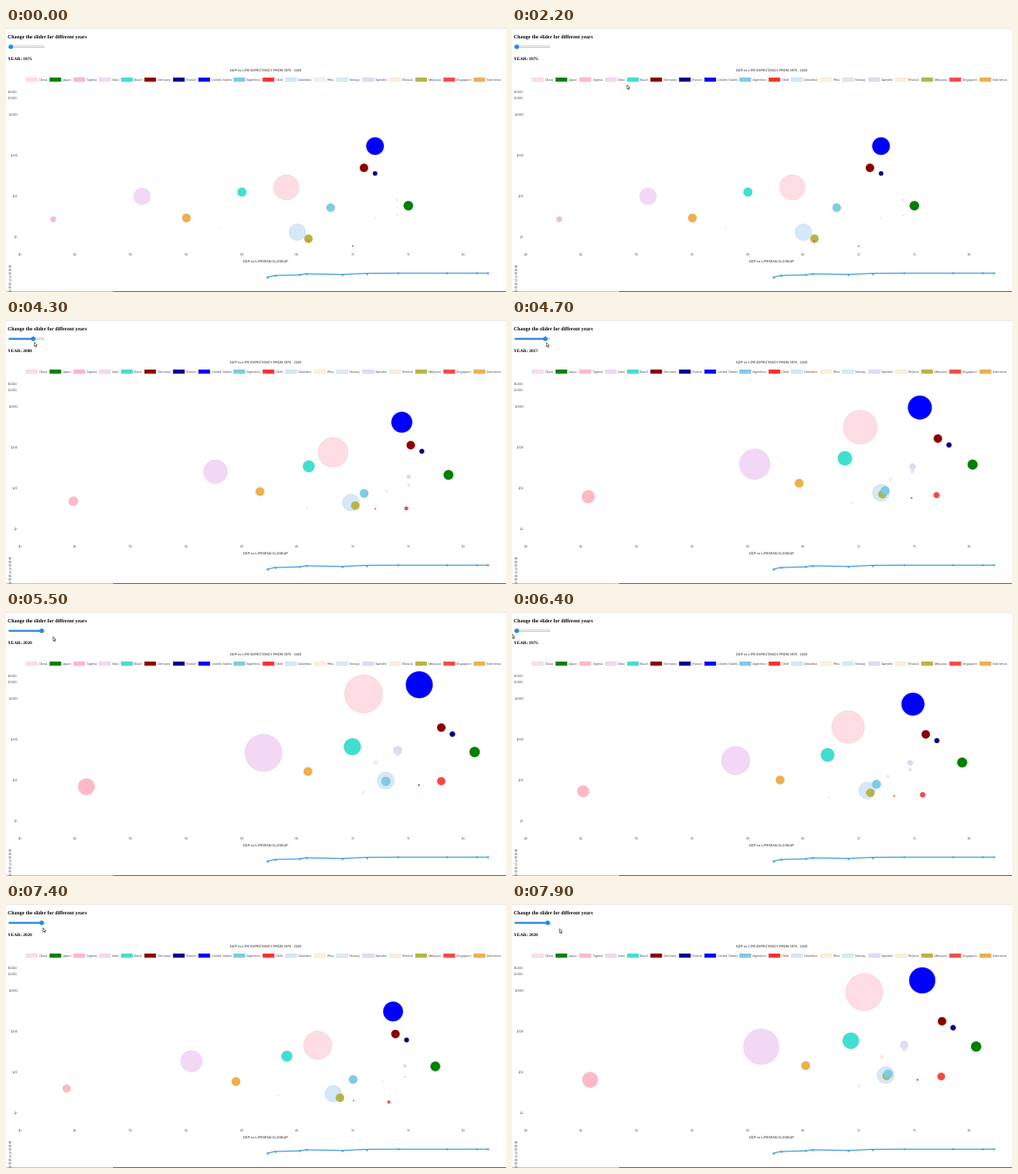
These frames come from a looping animation (574x304 px, 8000 ms). A matplotlib script:

```python
import numpy as np
import matplotlib.pyplot as plt
from matplotlib.animation import FuncAnimation
from matplotlib.colors import to_rgb
from matplotlib.patches import Circle, FancyBboxPatch, Polygon, Rectangle

W, H, DPI = 574, 304, 100
FRAMES, STEP = 80, 100
PT = 72 / DPI  # points per pixel
BLUE = "#2489ee"

plt.rcParams["text.hinting"] = "none"
fig = plt.figure(figsize=(W / DPI, H / DPI), dpi=DPI, facecolor="white")
ax = fig.add_axes([0, 0, 1, 1])
ax.set_xlim(0, W)
ax.set_ylim(H, 0)
ax.axis("off")

# name, colour, then 1975 and 2020 values of life expectancy, GDP and bubble radius
COUNTRIES = [
    ("China", "#fddde3", (64, 71), (163, 13750), (14.5, 22)),
    ("Japan", "#008000", (75, 81), (58, 491), (5.3, 5.8)),
    ("Nigeria", "#ffb9c6", (43, 46), (27, 69), (3, 9.4)),
    ("India", "#f3d8f6", (51, 62), (98, 468), (9.5, 21.5)),
    ("Brazil", "#40e0d0", (60, 70), (125, 659), (5, 9.7)),
    ("Germany", "#8b0000", (71, 78), (491, 1938), (4.7, 4.7)),
    ("France", "#00008b", (72, 79), (357, 1342), (2.5, 3)),
    ("United States", "#0000ff", (72, 76), (1673, 22440), (10, 15.4)),
    ("Argentina", "#7ecbe6", (68, 73), (52, 93), (4.7, 5)),
    ("Chile", "#ff3028", (66, 76), (8, 76), (.5, .9)),
    ("Colombia", "#d5e8f7", (65, 73), (13, 98), (9.5, 9.8)),
    ("Peru", "#fcf1df", (58, 71), (17, 50), (.5, 1.3)),
    ("Norway", "#d9ebf3", (74, 74), (33, 446), (.6, 2.3)),
    ("Sweden", "#dfdaf5", (74, 74), (80, 542), (.7, 4.8)),
    ("Finland", "#fdeedd", (72, 72), (29, 273), (.6, 2.3)),
    ("Malaysia", "#b5b642", (66, 73), (9, 95), (4.7, 4.5)),
    ("Singapore", "#fd4742", (70, 78), (6, 95), (.7, 4.6)),
    ("Indonesia", "#eeb04a", (55, 66), (29, 163), (4.8, 4.8)),
]
LATE_GROWTH = {"China", "United States"}
NORDIC = {"Norway", "Sweden", "Finland"}

# Key points of the mouse: time in frames, x, y
POINTER = [(13, 409, 302), (21, 177.5, 116), (22, 132, 65.5), (30, 6, 23.5),
           (37, 6.7, 23.5), (38, 9.5, 24), (41, 29, 25.5), (47, 39.5, 26),
           (54, 54, 28.5), (60, 54, 28.5), (61, 43, 28), (64, 0, 25.5),
           (68, 0, 25.5), (71, 6.7, 25.5), (74, 42.5, 27.5), (77, 54.5, 28.5)]
DRAG_START = 37
KNOB_MIN, KNOB_MAX = 5.5, 41


def life_x(years):
    return 16 + 12.74 * (years - 40)


def gdp_y(log_gdp):
    return 240.5 - 47 * (log_gdp - 1)


def mix(pair, amount):
    return pair[0] + (pair[1] - pair[0]) * amount


def shade(color):
    return tuple(0.91 * np.array(to_rgb(color)))


def follow(targets):
    """Quartic ease-out of one second, restarted at every frame."""
    rate = 1 - (1 - STEP / 1000) ** 4
    values = [targets[0]]
    for target in targets[:-1]:
        values.append(values[-1] + rate * (target - values[-1]))
    return np.array(values)


clock = np.arange(FRAMES)
key_times, key_x, key_y = zip(*POINTER)
tips = np.column_stack([np.interp(clock, key_times, k) for k in (key_x, key_y)])
knobs = np.where(clock < DRAG_START, KNOB_MIN,
                 np.clip(tips[:, 0] - 1.2, KNOB_MIN, KNOB_MAX))
chosen = (knobs - KNOB_MIN) / (KNOB_MAX - KNOB_MIN)
early = follow(1 - (1 - chosen) ** 1.6)
late = follow(chosen ** 1.6)


def label(x, y, text, size, color="#606060", font="Liberation Sans", **kw):
    kw.setdefault("va", "center_baseline")
    return ax.text(x, y, text, fontsize=size * PT, color=color, family=font, **kw)


def heading(y, text, size):
    return label(2.3, y, text, size, "black", "Liberation Serif",
                 weight="bold", va="baseline")


def box(x, y, w, h, color, edge="none"):
    ax.add_patch(Rectangle((x, y), w, h, fc=color, ec=edge, lw=0.25, snap=False))


def pill(width, color, edge, z):
    return ax.add_patch(FancyBboxPatch((3, 20.8), width, 1.9, fc=color, ec=edge, lw=0.4,
                                       boxstyle="round,pad=0,rounding_size=0.9", zorder=z))


def draw_legend(left=23, last=537, y=59.4, key=13, pad=1.6):
    texts = [label(0, y, name, 3.85) for name, *_ in COUNTRIES]
    widths = [key + pad + t.get_window_extent().width for t in texts]
    gap = (last - left - sum(widths[:-1])) / (len(texts) - 1)
    x = left
    for text, width, (_, color, *_) in zip(texts, widths, COUNTRIES):
        box(x, y - 2.2, key, 4.4, color, shade(color))
        text.set_x(x + key + pad)
        x += width + gap


# Page frame and headings
box(0, 0, W, 0.8, "#e3e3e3")
box(0, 303, 123, 1, "#c4c4c4")
box(123, 303, W - 123, 1, "#6c6c6c")
heading(11.2, "Change the slider for different years", 5.85)
year_text = heading(37, "", 5.15)

# Slider
pill(40.5, "#efefef", "#b8b8b8", 2)
fill = pill(2, BLUE, "none", 3)
thumb = ax.add_patch(Circle((KNOB_MIN, 21.7), 2.6, fc=BLUE, lw=0, zorder=4))

# Chart titles and axes
for y, title in [(49, "GDP vs LIFE EXPECTANCY FROM 1975 - 2020"),
                 (268, "GDP vs LIFESPAN CLOSEUP")]:
    label(297.5, y, title, 3.73, weight="bold", ha="center")
for value in (10, 100, 1000, 10000, 25000, 35000):
    label(13.7, gdp_y(np.log10(value)), str(value), 4.1, ha="right")
for years in range(40, 81, 5):
    label(life_x(years), 260, str(years), 4.1, ha="center")
for i in range(8):
    label(7, 274 + 4 * i, str(90 - 5 * i), 4, ha="right")
draw_legend()

# Close-up line
closeup = [(300, 287), (308.5, 285), (336.5, 284.3), (344.5, 283), (385.5, 283.8),
           (414, 282.5), (450, 282.3), (505.5, 282.3), (540, 282.3), (553, 282.3)]
ax.plot(*zip(*closeup), color="#45a3dc", lw=1.25 * PT, marker="o",
        ms=2.3 * PT, mew=0, snap=False)

# Earlier countries lie on top, the wide pale bubble of Colombia below its neighbours
bubbles = []
for i, (name, color, *_) in enumerate(COUNTRIES):
    z = 5 if name == "Colombia" else 30 - i
    bubbles.append(ax.add_patch(Circle((0, 0), 1, fc=color, ec=shade(color),
                                       lw=0.25, zorder=z)))

ARROW = np.array([(0, 0), (0, 4.7), (1.1, 3.8), (1.9, 5.5), (2.6, 5.2),
                  (1.9, 3.5), (3.3, 3.4)])
pointer = ax.add_patch(Polygon(ARROW, fc="white", ec="#444444", lw=0.45, zorder=50))


def update(t):
    pointer.set_visible(t >= POINTER[0][0])
    pointer.set_xy(ARROW + tips[t])

    year_text.set_text(f"YEAR: {1975 + round(45 * chosen[t])}")
    thumb.set_center((knobs[t], 21.7))
    fill.set_width(knobs[t] - 3)

    lag = early[t] - late[t]
    for bubble, (name, _, life, gdp, radius) in zip(bubbles, COUNTRIES):
        years = mix(life, early[t])
        log_gdp = mix(np.log10(gdp), (late if name in LATE_GROWTH else early)[t])
        if name in NORDIC:  # their life expectancy peaks between the end years
            years += 4 * lag
            log_gdp -= 0.5 * lag
        bubble.set(center=(life_x(years), gdp_y(log_gdp)), radius=mix(radius, late[t]))
    return []


anim = FuncAnimation(fig, update, frames=FRAMES, interval=STEP, repeat=True,
                     repeat_delay=0, init_func=lambda: update(0))
plt.show()
```
